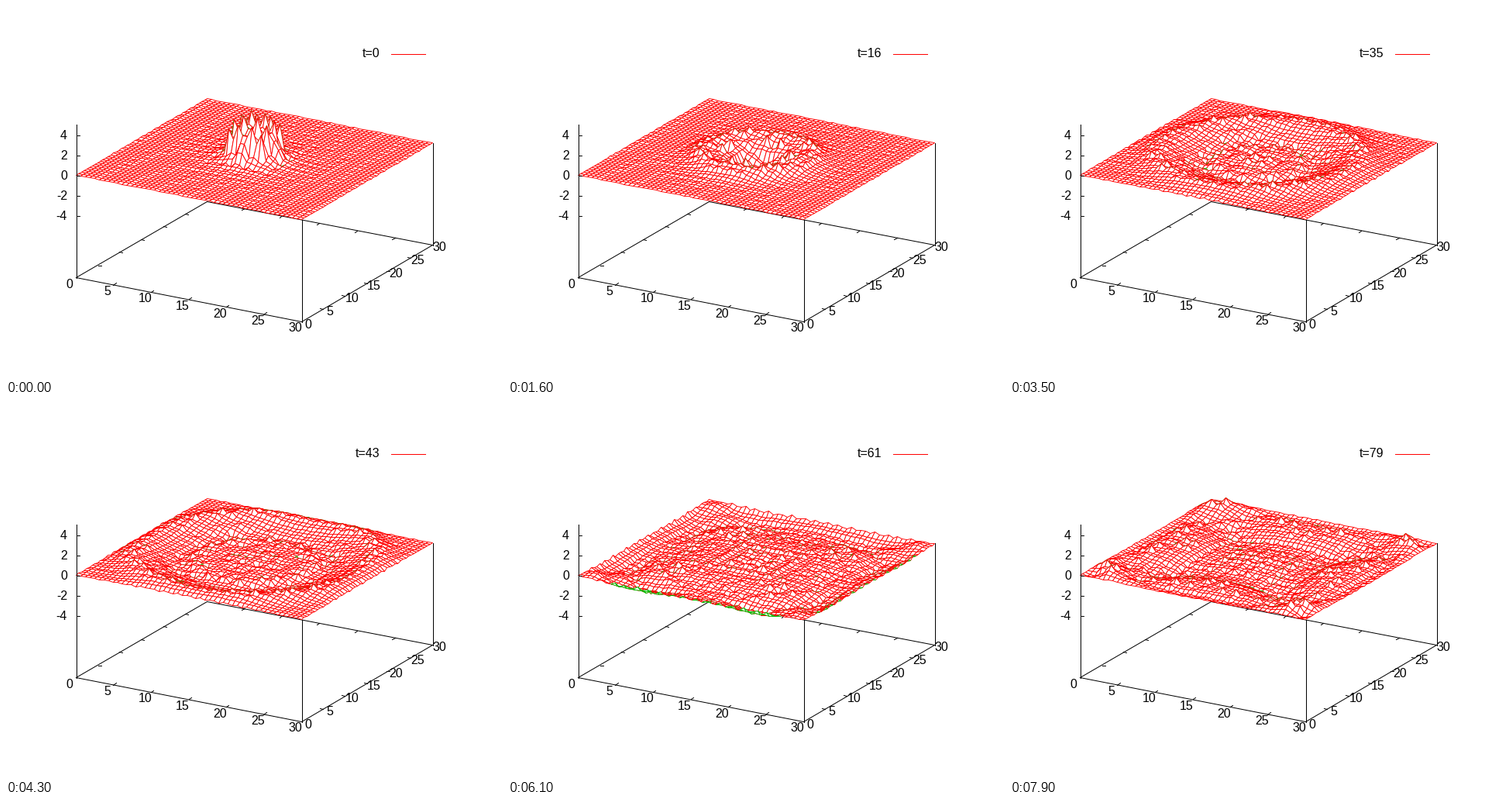
A matplotlib script for the animation above (8 s loop, 640 by 480 pixels).

```python
import numpy as np
import matplotlib.pyplot as plt
from matplotlib.animation import FuncAnimation
from matplotlib.collections import LineCollection, PolyCollection

W, H, DPI = 640, 480, 100
PX = 72 / DPI            # points per pixel
FRAMES, INTERVAL = 80, 100
SIZE, NODES = 30, 50     # domain size, plotted nodes per side
COURANT = 0.3
RED, GREEN = (1.0, 0, 0), (0, 0.75, 0)
FONT = dict(family="Liberation Sans", size=16 * PX, color="black")


def project(x, y, z):
    """Orthographic view, in pixels from the top left."""
    u, v = np.asarray(x) / SIZE, np.asarray(y) / SIZE
    return np.stack([90 + 291 * u + 169 * v,
                     218 + 57 * u - 98.5 * v - 13.2 * np.asarray(z)], axis=-1)


def simulate():
    """Wave equation on a clamped square membrane, released from a plug."""
    k = np.arange(SIZE + 1) - SIZE / 2
    u = np.where(np.hypot(k[:, None], k) <= 3, 5.0, 0.0)

    def push(a):
        d = np.zeros_like(a)
        d[1:-1, 1:-1] = (a[2:, 1:-1] + a[:-2, 1:-1] + a[1:-1, 2:]
                         + a[1:-1, :-2] - 4 * a[1:-1, 1:-1])
        return COURANT ** 2 * d

    prev = u + push(u) / 2     # starts at rest
    states = []
    for _ in range(FRAMES):
        states.append(u)
        prev, u = u, 2 * u - prev + push(u)
    return states


def resample_weights():
    """Inverse square distance weights from data points to plotted nodes."""
    data = np.arange(SIZE + 1)
    d2 = (np.linspace(0, SIZE, NODES)[:, None] - data) ** 2
    dist = d2[:, None, :, None] + d2[None, :, None, :]
    w = 1 / np.maximum(dist, 1e-9)
    w = w.reshape(NODES ** 2, -1)
    return w / w.sum(axis=1, keepdims=True)


weights = resample_weights()
heights = [(weights @ s.ravel()).reshape(NODES, NODES) for s in simulate()]
gx, gy = np.meshgrid(*[np.linspace(0, SIZE, NODES)] * 2, indexing="ij")

fig = plt.figure(figsize=(W / DPI, H / DPI), dpi=DPI, facecolor="white")
ax = fig.add_axes([0, 0, 1, 1])
ax.set_xlim(0, W)
ax.set_ylim(H, 0)
ax.axis("off")


def add_lines(segments, z, color="black"):
    segs = np.round(np.array(segments, float)) + 0.5
    ax.add_collection(LineCollection(segs, colors=color, linewidths=PX,
                                     capstyle="projecting", zorder=z))


def label(x, y, text, ha="center"):
    return ax.text(x, y + 5.5, text, ha=ha, va="baseline", zorder=5, **FONT)


def floor(x, y):
    return project(x, y, -10)


def tick(x, y, dx, dy):
    p = floor(x, y)
    d = floor(x + dx, y + dy) - p
    return [p, p + 4 * d / np.hypot(*d)]


S = SIZE
back = [[floor(0, 0), floor(0, S)], [floor(0, S), floor(S, S)]]
front = [[floor(0, 0), floor(S, 0)], [floor(S, 0), floor(S, S)],
         [(90, 152), (90, 350)],
         [project(S, 0, 0), floor(S, 0)],
         [project(S, S, 0), floor(S, S)]]
for n, v in enumerate(range(0, S + 1, 5)):
    if 0 < v < S:
        back += [tick(0, v, 1, 0), tick(v, S, 0, -1)]
        front += [tick(v, 0, 0, 1), tick(S, v, -1, 0)]
    label(82 + 48.6 * n, 358 + 9.5 * n, str(v))
    label(390 + 28.2 * n, 410 - 16.5 * n, str(v))
for z in range(-4, 5, 2):
    y = 218 - 13 * z
    front.append([(90, y), (94, y)])
    label(79, y, str(z), "right")

add_lines(back, 1)
add_lines(front, 3)
add_lines([[(496, 61), (540, 61)]], 3, RED)
clock = label(482, 61, "t=0", "right")

mesh = PolyCollection([], facecolors="white", linewidths=0.9 * PX,
                      joinstyle="bevel", zorder=2)
ax.add_collection(mesh)


def draw(t):
    p = project(gx, gy, heights[t])
    quads = np.stack([p[:-1, :-1], p[1:, :-1], p[1:, 1:], p[:-1, 1:]], axis=2)
    # far cells first, so that near ones cover them
    quads = quads[:, ::-1].reshape(-1, 4, 2)
    a, b = quads[:, 2] - quads[:, 0], quads[:, 3] - quads[:, 1]
    upper = a[:, 0] * b[:, 1] - a[:, 1] * b[:, 0] < 0
    mesh.set_verts(np.round(quads) + 0.5)
    mesh.set_edgecolor(np.where(upper[:, None], RED, GREEN))
    clock.set_text(f"t={t}")
    return mesh, clock


anim = FuncAnimation(fig, draw, frames=FRAMES, interval=INTERVAL,
                     repeat=True, repeat_delay=0, blit=False)
plt.show()
```
